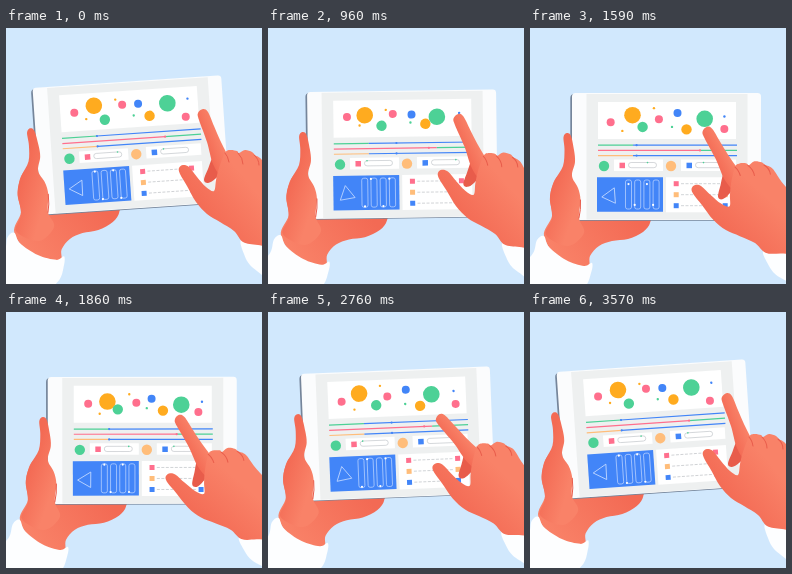
An HTML page with a canvas for the animation above (3600 ms loop, 256 by 256 pixels).

```html
<!DOCTYPE html>
<html lang="en">
<head>
<meta charset="utf-8">
<title>Tablet dashboard</title>
<style>
html, body { margin: 0; width: 100%; height: 100%; overflow: hidden; background: #d1e8fd; }
canvas { display: block; width: 100vw; height: 100vh; }
</style>
</head>
<body>
<canvas id="stage" width="256" height="256"></canvas>
<script>
const ctx = document.getElementById('stage').getContext('2d');
const LOOP = 3600;
const PINK = '#ff6f8d', ORANGE = '#ffab1f', PEACH = '#ffbd7a', GREEN = '#4dd196', BLUE = '#4285f8';
const SKIN = '#f98268', SHADE = '#e85c4b', RED = '#f36a54';

const wave = (t, cycles, phase) => Math.sin(2 * Math.PI * (cycles * t / LOOP + phase));
const swing = t => Math.cos(4 * Math.PI * t / LOOP);

// Eased 0 to 1 between two times.
function ease(t, from, to) {
  const u = Math.min(1, Math.max(0, (t - from) / (to - from)));
  return (1 - Math.cos(Math.PI * u)) / 2;
}

// Eased 0 to 1 and back to 0.
function bump(t, from, to) {
  const mid = (from + to) / 2;
  return ease(t, from, mid) - ease(t, mid, to);
}

function turned(x, y, angle, draw) {
  ctx.save();
  ctx.translate(x, y);
  ctx.rotate(angle);
  ctx.translate(-x, -y);
  draw();
  ctx.restore();
}

function box(x, y, w, h, color, r = 0) {
  ctx.fillStyle = color;
  ctx.beginPath();
  ctx.roundRect(x, y, w, h, r);
  ctx.fill();
}

function outline(x, y, w, h, color, r) {
  ctx.strokeStyle = color;
  ctx.lineWidth = 0.7;
  ctx.beginPath();
  ctx.roundRect(x, y, w, h, r);
  ctx.stroke();
}

function disc(x, y, r, color) {
  ctx.fillStyle = color;
  ctx.beginPath();
  ctx.arc(x, y, r, 0, 7);
  ctx.fill();
}

function line(x1, y1, x2, y2, color, width) {
  ctx.strokeStyle = color;
  ctx.lineWidth = width;
  ctx.beginPath();
  ctx.moveTo(x1, y1);
  ctx.lineTo(x2, y2);
  ctx.stroke();
}

// Rounded closed outline through points.
function blob(points, fill) {
  const n = points.length, p = i => points[(i + n) % n];
  ctx.beginPath();
  ctx.moveTo(...points[0]);
  for (let i = 0; i < n; i++) {
    const [a, b, c, d] = [p(i - 1), p(i), p(i + 1), p(i + 2)];
    ctx.bezierCurveTo(b[0] + (c[0] - a[0]) / 6, b[1] + (c[1] - a[1]) / 6,
      c[0] - (d[0] - b[0]) / 6, c[1] - (d[1] - b[1]) / 6, c[0], c[1]);
  }
  ctx.fillStyle = fill;
  ctx.fill();
}

function crease(x1, y1, cx, cy, x2, y2) {
  ctx.strokeStyle = SHADE;
  ctx.lineWidth = 1;
  ctx.lineCap = 'round';
  ctx.beginPath();
  ctx.moveTo(x1, y1);
  ctx.quadraticCurveTo(cx, cy, x2, y2);
  ctx.stroke();
  ctx.lineCap = 'butt';
}

function fade(x1, y1, x2, y2, from, to) {
  const g = ctx.createLinearGradient(x1, y1, x2, y2);
  g.addColorStop(0, from);
  g.addColorStop(1, to);
  return g;
}

const bubbles = [
  [82, 92.5, 4, PINK], [100.5, 88, 8.3, ORANGE], [114, 99.5, 5.2, GREEN], [129, 89.5, 4, PINK],
  [146, 87, 4, BLUE], [158.5, 100, 5.2, ORANGE], [173.5, 91, 8.3, GREEN], [194, 102, 4, PINK],
  [94, 101, 1.2, ORANGE], [122, 82, 1.2, ORANGE], [143, 98, 1.2, GREEN], [195, 88, 1.2, BLUE]
];

function chart(t) {
  box(68, 74, 138, 37, '#fff');
  bubbles.forEach(([x, y, r, color], i) =>
    disc(x + 2 * wave(t, 2, i * 0.37), y + 2 * wave(t, 3, i * 0.61), r, color));
}

function tracks(t) {
  const rows = [[103, GREEN, BLUE, 28], [171, PINK, GREEN, -8], [103, PEACH, BLUE, 28]];
  rows.forEach(([split, left, right, travel], i) => {
    const y = 117.2 + 5.2 * i;
    line(68, y, split, y, left, 1.2);
    line(split, y, 207, y, right, 1.2);
    disc(split + travel * (1 - swing(t)) / 2, y, 1.1, i === 1 ? PINK : BLUE);
  });
}

function field(t, x, width, dot, color, phase) {
  disc(x - 10, 138, 5.2, dot);
  box(x, 131.5, width, 11.5, '#fff');
  box(x + 5.5, 134.7, 5.5, 5.5, color);
  outline(x + 14.5, 134.5, 28, 5.2, '#c4c8cc', 2.6);
  disc(x + 28 + 11 * wave(t, 2, phase), 134.6, 0.8, GREEN);
}

function mixer(t) {
  const ink = '#c3d9ff';
  box(67, 149.3, 66, 34.5, BLUE);
  turned(80.5, 168, (10 + 20 * swing(t)) * Math.PI / 180, () => {
    ctx.strokeStyle = ink;
    ctx.lineWidth = 0.8;
    ctx.beginPath();
    ctx.moveTo(80.5, 159);
    ctx.lineTo(88, 172.5);
    ctx.lineTo(73, 172.5);
    ctx.closePath();
    ctx.stroke();
  });
  for (let i = 0; i < 4; i++) {
    const x = 95.5 + 9.2 * i, side = i % 2 ? 1 : -1;
    outline(x, 152, 6, 29, ink, 2);
    disc(x + 1.5 - 1.5 * side, 166.5 + 14 * side * swing(t), 1.1, '#fff');
  }
}

function list() {
  box(136, 149.3, 70, 35, '#fff');
  [PINK, PEACH, BLUE].forEach((color, i) => {
    const y = 155.7 + 11 * i;
    box(143.7, y - 2.5, 5, 5, color);
    box(192.7, y - 2.5, 5, 5, color);
    ctx.setLineDash([3, 1.5]);
    line(151, y, 190, y, '#c6c9cd', 0.8);
    ctx.setLineDash([]);
  });
}

function tablet(t) {
  box(40.3, 66, 170, 126.8, '#75859a', 4);
  box(42, 65, 189, 127, '#fbfcfd', 3.5);
  box(56.5, 66, 161, 125.5, '#eef0f0');
  chart(t);
  tracks(t);
  field(t, 84, 49, GREEN, PINK, 0.2);
  field(t, 151, 55, PEACH, BLUE, 0.7);
  mixer(t);
  list();
}

function leftPalm() {
  blob([[14, 208], [22, 188], [20, 169], [28, 148], [50, 150], [80, 184], [117, 188], [120, 195],
    [113, 204], [98, 211], [82, 213], [69, 218], [60, 228], [57, 241], [30, 232]],
    fade(30, 235, 100, 185, SKIN, RED));
}

function leftThumb() {
  blob([[37, 105], [41, 108], [44, 122], [45, 134], [42, 148], [48, 160], [50.5, 172], [49, 190],
    [54, 205], [38, 218], [16, 207], [22, 190], [20, 168], [25, 152], [33, 138], [34.5, 122], [33.5, 109]],
    fade(20, 165, 48, 175, RED, SKIN));
  crease(50.5, 172, 51, 182, 49, 190);
}

function leftSleeve() {
  blob([[14, 208], [19, 219], [36, 232], [54, 238], [62, 235], [61, 245], [54, 260], [30, 275],
    [-35, 275], [-25, 245], [1, 228], [7, 212]], '#fdfeff');
}

function indexFinger() {
  blob([[197, 81], [202, 84], [208, 98], [214, 112], [221, 126], [228, 140], [216, 148],
    [207, 136], [201, 114], [193, 92], [192, 85]], fade(196, 110, 212, 104, RED, SKIN));
}

function rightHand(bend) {
  blob([[235, 212], [250, 215], [276, 218], [320, 222], [330, 290], [285, 275], [257, 248],
    [244, 237], [238, 226]], '#fdfeff');
  blob([[208, 129], [216, 142], [209, 151], [202, 155], [198, 152], [202, 141]], SHADE);
  turned(221, 133, -bend, indexFinger);
  blob([[219, 125], [224, 122], [231, 123], [233, 125], [239, 122], [246, 124], [249, 127],
    [256, 132], [263, 146], [277, 170], [286, 200], [275, 219], [252, 217], [237, 214], [228, 203],
    [214, 194], [201, 186], [190, 174], [181, 158], [174, 146], [173, 140], [177, 137], [183, 139],
    [191, 149], [200, 159], [208, 163], [210, 152], [213, 140]],
    fade(190, 182, 235, 145, RED, SKIN));
  crease(219, 125, 222, 128, 223, 134);
  crease(232, 125, 237, 130, 237, 136);
  crease(248, 127, 253, 131, 253, 137);
}

function draw(t) {
  ctx.fillStyle = '#d1e8fd';
  ctx.fillRect(0, 0, 256, 256);
  const tilt = 0.068 * (1 - ease(t, 0, 1350) + ease(t, 1700, LOOP));
  turned(-38, 290, -tilt, () => {
    leftPalm();
    tablet(t);
    leftThumb();
    leftSleeve();
  });
  const reach = 0.18 * bump(t, 510, LOOP);
  const bend = 0.2 * bump(t, 0, 1100) + 0.25 * bump(t, 1860, LOOP);
  turned(311, 230, -reach, () => rightHand(bend));
}

const start = performance.now();
function tick() {
  const t = (performance.now() - start) % LOOP;
  draw(Math.floor(t / 30) * 30);
  requestAnimationFrame(tick);
}
tick();
</script>
</body>
</html>
```
